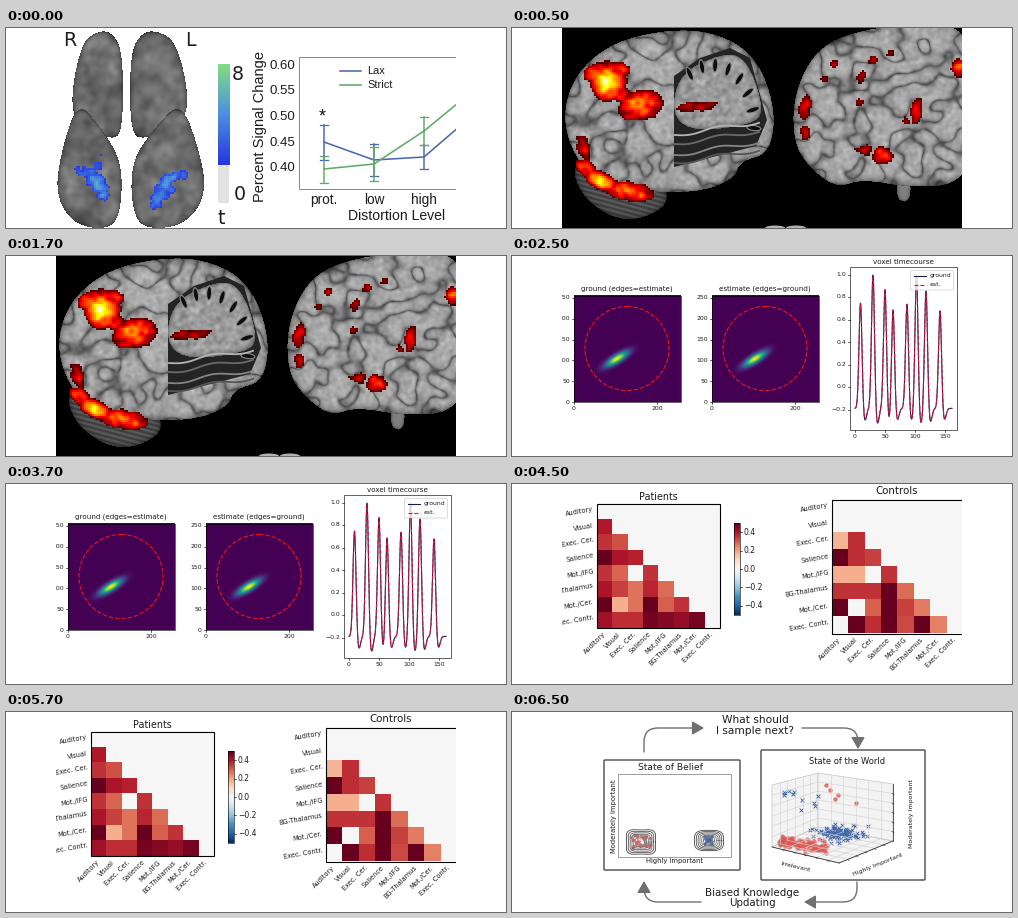
A matplotlib script for the animation above (8 s loop, 500 px wide and 200 px high).

```python
import numpy as np
import matplotlib.pyplot as plt
from matplotlib.animation import FuncAnimation
from matplotlib.colors import LinearSegmentedColormap
from matplotlib.patches import Circle, Ellipse, FancyArrowPatch, FancyBboxPatch, Polygon, Rectangle
from matplotlib.path import Path

plt.rcParams["font.family"] = "DejaVu Sans"
W, H, LEFT, RIGHT = 500, 200, 50, 450
PT = 0.72  # points per pixel at 100 dpi
DASH = (0, (3.7, 1.6))
fig = plt.figure(figsize=(W / 100, H / 100), dpi=100, facecolor="white")
X, Y = np.meshgrid(np.arange(LEFT, RIGHT) + 0.5, np.arange(H) + 0.5)


# ---- drawing helpers, all in stage pixels ----
def stage(color="white"):
    ax = fig.add_axes([LEFT / W, 0, (RIGHT - LEFT) / W, 1])
    ax.set(xlim=(LEFT, RIGHT), ylim=(H, 0))
    ax.axis("off")
    rect(ax, LEFT, 0, RIGHT, H, fc=color, zorder=-5)
    return ax


def text(ax, x, y, s, px, ha="center", va="center", color="#1c1c1c", **kw):
    ax.text(x, y, s, fontsize=px * PT, ha=ha, va=va, color=color, clip_on=True, **kw)


def line(ax, xs, ys, color="black", px=1.0, **kw):
    ax.plot(xs, ys, color=color, lw=px * PT, **kw)


def rect(ax, x0, y0, x1, y1, fc="none", ec="none", px=1.0, **kw):
    ax.add_patch(Rectangle((x0, y0), x1 - x0, y1 - y0, fc=fc, ec=ec, lw=px * PT, **kw))


def picture(ax, data, box=(LEFT, RIGHT, H, 0), **kw):
    ax.imshow(data, extent=box, aspect="auto", **kw)


def signed(value):
    return f"{value:.1f}".replace("-", "\u2212")


# ---- brain surfaces ----
def blur(a, s):
    fy, fx = np.fft.fftfreq(a.shape[0])[:, None], np.fft.fftfreq(a.shape[1])
    return np.fft.ifft2(np.fft.fft2(a) * np.exp(-2 * (np.pi * s) ** 2 * (fx**2 + fy**2))).real


def noise(seed, s):
    n = blur(np.random.default_rng(seed).standard_normal(X.shape), s)
    return n / n.std()


def rounded(points, rounds=3):
    p = np.array(points, float)
    for _ in range(rounds):
        q = np.roll(p, -1, axis=0)
        p = np.stack([0.75 * p + 0.25 * q, 0.25 * p + 0.75 * q], 1).reshape(-1, 2)
    return p


def surface(ax, points, tone, rim=4, zorder=1):
    """Paint a grey tone inside a rounded outline, darker near its rim."""
    mask = Path(rounded(points)).contains_points(np.c_[X.ravel(), Y.ravel()]).reshape(X.shape)
    pad = np.pad(mask.astype(float), 30, mode="edge")
    light = np.clip(2 * blur(pad, rim)[30:-30, 30:-30] - 1, 0, 1) ** 0.4
    grey = np.clip(tone * (0.5 + 0.5 * light), 0, 1)
    picture(ax, np.dstack([grey, grey, grey, mask]), zorder=zorder)


def activation(ax, blobs, cmap, seed, start, span, rough=0.2):
    """Blobs are (x, y, rx, ry, tilt in degrees, peak)."""
    field = np.full(X.shape, -1.0)
    for x, y, rx, ry, tilt, peak in blobs:
        c, s = np.cos(np.radians(tilt)), np.sin(np.radians(tilt))
        u, v = (X - x) * c + (Y - y) * s, (Y - y) * c - (X - x) * s
        field = np.maximum(field, peak * (1.1 - (u / rx) ** 2 - (v / ry) ** 2))
    field = field + rough * noise(seed, 2) * np.clip(field + 0.6, 0, 1)
    field = field[::2, ::2].repeat(2, 0).repeat(2, 1)
    rgba = cmap(np.clip(start + span * field, 0, 1))
    rgba[..., 3] = field > 0.04
    picture(ax, rgba, zorder=4, interpolation="nearest")


def ventral_view():
    ax = stage()
    tone = 0.43 + 0.035 * noise(4, 5) + 0.025 * noise(5, 2.5)
    front = np.array([(92, 3), (76, 14), (65, 65), (69, 95), (104, 112), (117, 105), (117, 24), (106, 4)])
    back = np.array([(72, 73), (56, 120), (49, 165), (66, 195), (96, 202), (114, 192), (117, 135), (94, 98)])
    for lobe, z in ((front, 1), (back, 2)):
        surface(ax, lobe, tone, zorder=z)
        mirrored = np.c_[124 + 1.13 * (117 - lobe[:, 0]), lobe[:, 1]]
        surface(ax, mirrored, tone, zorder=z)
    cool = LinearSegmentedColormap.from_list("cool_t", ["#2337e0", "#4b8fe0", "#82dc82"])
    activation(ax, [(91, 155, 12, 9, 30, 0.8), (80, 143, 12, 5, 15, 0.3), (92, 134, 4, 8, 15, 0.25),
                    (96, 167, 6, 6, 0, 0.3), (157, 160, 11, 11, 0, 0.5), (164, 150, 11, 6, -20, 0.7),
                    (150, 172, 6, 9, 20, 0.35), (178, 146, 4, 4, 0, 0.2)], cool, 8, 0, 0.8)

    picture(ax, np.linspace(1, 0, 100)[:, None], (211.5, 223, 137, 36), cmap=cool)
    rect(ax, 211.5, 137, 223, 175, fc="#e2e2e2")
    for x, y, s in ((64, 13, "R"), (184, 13, "L"), (232, 46, "8"), (234, 167, "0"), (215, 190, "t")):
        text(ax, x, y, s, 19)

    rect(ax, 293, 29, 460, 161, ec="#8a8a8a")
    font = dict(family="Liberation Sans")
    for i in range(5):
        text(ax, 289, 140 - 25.5 * i, f"{0.4 + 0.05 * i:.2f}", 13.3, ha="right", **font)
    xs = [318, 368, 418, 468]
    for x, s in zip(xs, ("prot.", "low", "high")):
        text(ax, x, 172, s, 13.6, **font)
    text(ax, 391, 188, "Distortion Level", 14, **font)
    text(ax, 254, 99, "Percent Signal Change", 14.6, rotation=90, **font)
    text(ax, 316, 89, "*", 18, **font)
    series = (("Lax", "#4c68ae", 43, (114, 132, 129, 86), (17.5, 16, 12)),
              ("Strict", "#62a968", 57, (141, 136, 103, 62), (13.5, 17, 14)))
    for name, color, row, ys, errors in series:
        line(ax, xs, ys, color, 1.6)
        for x, y, e in zip(xs, ys, errors):
            line(ax, [x, x], [y - e, y + e], color, 1.5)
            for cap in (y - e, y + e):
                line(ax, [x - 4, x + 4], [cap, cap], color, 1.3)
        line(ax, [334, 355], [row, row], color, 1.6)
        text(ax, 361, row, name, 11, ha="left", **font)
    return ax


def rendered_brains():
    ax = stage("black")
    tone = 0.33 + 0.34 * np.tanh(1.9 * np.abs(noise(21, 5.5))) + 0.03 * noise(22, 1.5)
    cerebellum = [(60, 130), (66, 164), (98, 190), (132, 192), (163, 170), (130, 135)]
    cerebrum = [(50, 105), (58, 52), (96, 16), (150, 2), (200, 3), (243, 26), (264, 80), (258, 126),
                (228, 133), (222, 152), (180, 166), (85, 162)]
    right = [(282, 118), (281, 68), (303, 22), (344, 2), (455, -12), (472, 80), (455, 155), (400, 160),
             (350, 151), (325, 160), (300, 142)]
    surface(ax, [(385, 150), (385, 173), (398, 174), (399, 150)], 0.5, 2)
    surface(ax, cerebellum, 0.3 + 0.06 * np.sin(Y * 1.3 - X * 0.35))
    surface(ax, cerebrum, tone, 6, 2)
    surface(ax, right, tone, 6, 2)

    # cut-out with the inner slice
    ax.add_patch(Polygon([(162, 48), (188, 30), (218, 20), (238, 30), (255, 92), (244, 118), (162, 139)],
                         fc="#242424", zorder=3))
    surface(ax, [(162, 48), (162, 105), (246, 97), (251, 76), (236, 33), (214, 23)],
            0.61 + 0.04 * noise(24, 1.5), 3, 3)
    for a in np.radians(np.linspace(-122, 5, 8)):
        dx, dy = 42 * np.cos(a), 58 * np.sin(a)
        ax.add_patch(Ellipse((200 + dx, 95 + dy), 14, 5, angle=np.degrees(np.arctan2(dy, dx)),
                             fc="#0c0c0c", ec="#8a8a8a", lw=0.8, zorder=3))
    t = np.linspace(0, 1, 30)
    for y, shade in ((107, "#b5b5b5"), (116, "#6a6a6a"), (127, "#858585"), (135, "#555555")):
        line(ax, 163 + 84 * t, y - 13 * t + 2 * np.sin(9 * t), shade, 1.8, zorder=3)

    hot = plt.get_cmap("hot")
    activation(ax, [(96, 53, 18, 20, 0, 1), (84, 44, 13, 9, -20, 0.75), (107, 41, 11, 8, 20, 0.4),
                    (128, 77, 23, 15, -10, 0.72), (109, 66, 8, 8, 0, 0.4), (185, 78, 22, 5, -6, 0.35),
                    (71, 120, 7, 15, -15, 0.35), (74, 140, 13, 8, 45, 0.55), (88, 152, 17, 9, 25, 1),
                    (118, 163, 25, 10, 8, 0.7)], hot, 30, 0.06, 0.62, 0.1)
    specks = [(312, 50), (322, 35), (347, 51), (360, 32), (350, 46), (347, 74), (378, 24), (394, 92)]
    activation(ax, [(293, 79, 6, 13, 12, 0.5), (293, 104, 5, 8, 0, 0.35), (404, 82, 6, 12, 10, 0.35),
                    (370, 127, 11, 9, 0, 0.5), (352, 122, 9, 6, 15, 0.3), (447, 39, 8, 10, 0, 0.55)]
               + [(x, y, 4, 4, 0, 0.2) for x, y in specks], hot, 30, 0.06, 0.62, 0.1)
    for x in (263, 284):
        ax.add_patch(Ellipse((x, 200), 20, 5, fc="#b8b0b0"))
    return ax


def timecourse():
    ax = stage()
    xx, yy = np.meshgrid(np.arange(256), np.arange(256))
    a = np.radians(32)
    u = (xx - 102) * np.cos(a) + (yy - 103) * np.sin(a)
    w = (yy - 103) * np.cos(a) - (xx - 102) * np.sin(a)
    bump = np.exp(-((u / 21) ** 2 + (w / 6.5) ** 2) / 2)
    for x0, title in ((62, "ground (edges=estimate)"), (200, "estimate (edges=ground)")):
        x1, y0, y1, scale = x0 + 106.5, 39.5, 146, 106.5 / 256
        picture(ax, bump, (x0, x1, y1, y0), origin="lower", cmap="viridis")
        rect(ax, x0, y0, x1, y1, ec="black", px=0.6)
        ax.add_patch(Circle((x0 + 53, 92.5), 42, fill=False, ec="#e0141e", lw=1.2 * PT, ls=DASH))
        text(ax, (x0 + x1) / 2, 33, title, 7.2)
        for v in range(0, 251, 50):
            y = y1 - v * scale
            line(ax, [x0 - 2, x0], [y, y], px=0.6)
            text(ax, x0 - 4, y, str(v), 6.1, ha="right")
            if v % 200 == 0:
                x = x0 + v * scale
                line(ax, [x, x], [y1, y1 + 2], px=0.6)
                text(ax, x, 153, str(v), 6.1)

    x = np.linspace(343, 440, 700)
    signal = np.full_like(x, -0.19)
    for peak, top in ((348.5, 0.75), (361, 1.0), (373, 0.87), (381, 0.7), (395, 0.74), (404.5, 1.0),
                      (414, 0.86), (428, 0.68)):
        signal += (top + 0.19) * (np.exp(-((x - peak) / 1.5) ** 2 / 2)
                                  - 0.12 * np.exp(-((x - peak - 4.3) / 1.7) ** 2 / 2))
    rect(ax, 338, 11, 444.5, 174, ec="black", px=0.6)
    text(ax, 391, 6, "voxel timecourse", 7.2)
    for i in range(-1, 6):
        y = 131 - 22.5 * i
        line(ax, [336, 338], [y, y], px=0.6)
        text(ax, 334, y, signed(i / 5), 6.1, ha="right")
    for v in range(0, 151, 50):
        line(ax, [343 + 0.6 * v] * 2, [174, 176], px=0.6)
        text(ax, 343 + 0.6 * v, 181, str(v), 6.1)
    ax.add_patch(FancyBboxPatch((399.5, 15.5), 41, 17.5, boxstyle="round,pad=1", fc="white", ec="#cccccc",
                                lw=0.6, alpha=0.8, zorder=3))
    for name, row, color, style in (("ground", 20, "#12204f", "-"), ("est.", 28.5, "#d8143c", DASH)):
        line(ax, x, 131 - 112.5 * signal, color, 1.1, ls=style)
        line(ax, [402, 414], [row, row], color, 1.1, ls=style, zorder=4)
        text(ax, 418, row, name, 6.1, ha="left", zorder=4)
    return ax


def matrices():
    ax = stage()
    labels = ["Auditory", "Visual", "Exec. Cer.", "Salience", "Mot./IFG", "BG-Thalamus", "Mot./Cer.",
              "Exec. Contr."]
    patients = [[], [40], [36, 32], [52, 41, 39], [36, 29, 0, 36], [41, 34, 27, 38, 28],
                [52, 18, 27, 50, 30, 36], [42, 37, 37, 48, 46, 44, 48]]
    controls = [[], [0], [17, 37], [50, 37, 34], [18, 18, 0, 36], [36, 36, 36, 50, 28],
                [52, 0, 30, 50, 34, 26], [0, 50, 37, 50, 33, 50, 25]]
    for (x0, y0, x1, y1), rows, title, tx, ty, size in (
            ((85, 19.5, 207.5, 144), patients, "Patients", 146, 13, 9.7),
            ((320, 15.5, 451, 149.5), controls, "Controls", 385, 7, 10.3)):
        grid = np.zeros((8, 8))
        for r, row in enumerate(rows):
            grid[r, :len(row)] = row
        picture(ax, grid, (x0, x1, y1, y0), cmap="RdBu_r", vmin=-50, vmax=50, interpolation="nearest")
        rect(ax, x0, y0, x1, y1, ec="black", px=1.1)
        text(ax, tx, ty, title, size)
        dx, dy = (x1 - x0) / 8, (y1 - y0) / 8
        for i, s in enumerate(labels):
            text(ax, x0 - 3, y0 + dy * (i + 0.5), s, 6.7, ha="right", rotation=10)
            text(ax, x0 + dx * (i + 0.5) + 2, y1 + 3, s, 6.7, ha="right", va="top", rotation=45)
    picture(ax, np.linspace(1, 0, 100)[:, None], (222, 228, 131, 39), cmap="RdBu_r")
    rect(ax, 222, 39, 228, 131, ec="black", px=0.6)
    for i in range(-2, 3):
        y = 85 - 18.4 * i
        line(ax, [228, 230], [y, y], px=0.6)
        text(ax, 232, y, signed(i / 5), 7.6, ha="left")
    return ax


def belief_loop():
    ax = stage()
    rng = np.random.default_rng(3)
    red, blue, grey = "#dc5750", "#3f66a8", "#707070"

    def frame(x0, y0, x1, y1):
        ax.add_patch(FancyBboxPatch((x0 + 1, y0 + 1), x1 - x0 - 2, y1 - y0 - 2, boxstyle="round,pad=1",
                                    fc="white", ec="#4a4a4a", lw=1.4 * PT))

    def arrow(start, corner, end, bend=14):
        a, c, b = (np.array(p, float) for p in (start, corner, end))
        into, out = (c + bend * (p - c) / np.hypot(*(p - c)) for p in (a, b))
        path = Path([a, into, c, out, b], [Path.MOVETO, Path.LINETO, Path.CURVE3, Path.CURVE3, Path.LINETO])
        ax.add_patch(FancyArrowPatch(path=path, arrowstyle="-|>,head_length=.55,head_width=.32",
                                     mutation_scale=13, fc=grey, ec=grey, lw=1.4 * PT))

    def dots(x, y, marker, color, size, lw=0.65, alpha=1):
        ax.scatter(x, y, s=(size * PT) ** 2, marker=marker, color=color, linewidths=lw, alpha=alpha)

    text(ax, 243, 8, "What should", 10.6)
    text(ax, 243, 19, "I sample next?", 10.6)
    text(ax, 240, 181, "Biased Knowledge", 10.2)
    text(ax, 240, 191, "Updating", 10.2)
    arrow((132, 40), (132, 16), (192, 16))
    arrow((290, 16), (346, 16), (346, 37))
    arrow((345, 170), (345, 190), (292, 190))
    arrow((189, 190), (132, 190), (132, 169))

    frame(92, 48, 228, 158)
    text(ax, 158, 55, "State of Belief", 9.2)
    rect(ax, 106, 61.5, 219, 145, ec="#888888", px=0.8)
    text(ax, 162, 149.5, "Highly Important", 6.8)
    text(ax, 102, 104, "Moderately Important", 6.8, rotation=90)
    t = np.linspace(0, 2 * np.pi, 120)
    c, s = (np.sign(f) * np.abs(f) ** 0.75 for f in (np.cos(t), np.sin(t)))
    for cx, cy, rx, ry, wobble in ((129, 130, 15.5, 13, 0.07), (197, 128.5, 15, 10.5, 0.03)):
        for k in np.linspace(0.25, 1, 7):
            r = k * (1 - wobble * np.cos(4 * t))
            line(ax, cx + rx * r * c, cy + ry * r * s, str(0.25 + 0.35 * (1 - k)), 0.8)
    dots(129 + rng.uniform(-10, 10, 40), 129 + rng.uniform(-7, 7, 40), "o", red, 3.4, 0, 0.6)
    dots(196 + rng.normal(0, 2, 8), 128 + rng.normal(0, 2, 8), "x", blue, 5)
    dots([196], [128], "x", blue, 9, 2)

    frame(249, 38, 413, 168)
    text(ax, 335, 50, "State of the World", 8.4)
    left, back, right, front = map(np.array, ((260, 135), (306, 115), (381, 129), (327, 151)))
    left_top, back_top, right_top = map(np.array, ((260, 73), (306, 61), (381, 72)))
    steps = np.arange(1, 6) / 6
    for p, q, r, s in ((left, back, back_top, left_top), (back, right, right_top, back_top),
                       (left, back, right, front)):
        ax.add_patch(Polygon([p, q, r, s], fc="#f3f3f3", ec="#c4c4c4", lw=0.5))
        for k in steps:
            line(ax, *zip(p + k * (q - p), s + k * (r - s)), "#d2d2d2", 0.6)
            line(ax, *zip(p + k * (s - p), q + k * (r - q)), "#d2d2d2", 0.6)
    for p, q in ((left, front), (front, right), (right, right_top)):
        line(ax, *zip(p, q), "#333333", 0.8)
        for k in steps:
            x, y = p + k * (q - p)
            line(ax, [x - 1, x + 1], [y, y + 1], "#333333", 0.6)

    dots(325 + rng.normal(0, 12, 95), 121 + rng.normal(0, 4.2, 95), "x", blue, 3.6)
    u = rng.uniform(-1, 1, 110)
    dots(291 + 24 * u, 132 + 4 * u + rng.normal(0, 3.2, 110), "o", red, 4.4, 0, 0.65)
    dots(rng.uniform(265, 312, 11), rng.uniform(79, 98, 11), "x", blue, 3.8)
    dots([318, 323, 326, 344, 314], [78, 87, 83, 91, 73], "o", red, 4.4, 0, 0.8)
    text(ax, 284, 155, "Irrelevant", 6.3, rotation=-13)
    text(ax, 366, 153, "Highly Important", 6.3, rotation=22)
    text(ax, 400, 102, "Moderately Important", 6.3, rotation=90)
    return ax


scenes = [ventral_view(), rendered_brains(), timecourse(), matrices(), belief_loop()]
STARTS = (0, 500, 2500, 4500, 6500)
STEP, LOOP = 500, 8000


def update(i):
    current = np.searchsorted(STARTS, i * STEP, side="right") - 1
    for k, ax in enumerate(scenes):
        ax.set_visible(k == current)
    return scenes


anim = FuncAnimation(fig, update, frames=LOOP // STEP, interval=STEP, repeat=True, repeat_delay=0)
plt.show()
```
